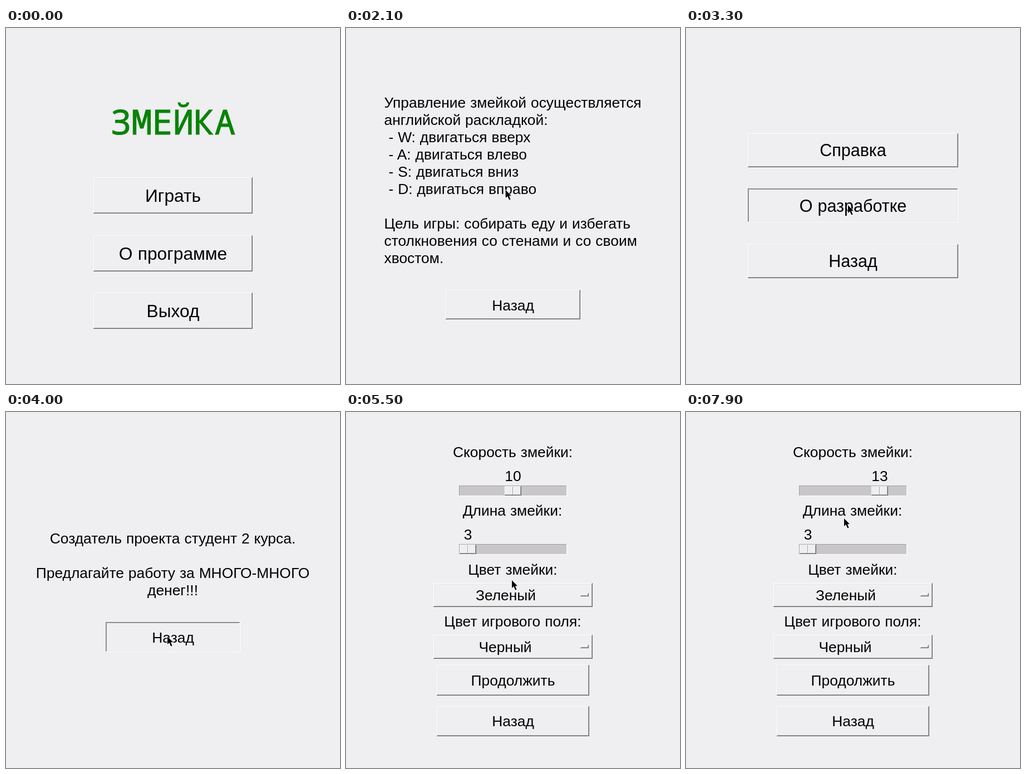
Write an HTML page that moves like this. It is 600 by 639 pixels and loops after 8000 ms.

```html
<!DOCTYPE html>
<html lang="ru">
<head>
<meta charset="utf-8">
<title>Змейка</title>
<style>
  html, body { margin: 0; width: 100%; height: 100%; overflow: hidden; background: #efeef0; }
  svg { display: block; }
  text { font-family: "Liberation Sans", Arial, sans-serif; white-space: pre; word-spacing: .6px; }
  .title { font-family: "Noto Sans Mono", monospace; fill: #078307; stroke: #078307; stroke-width: 1.1px; }
  rect { shape-rendering: crispEdges; }
</style>
</head>
<body>
<svg id="stage" width="600" height="639" viewBox="0 0 600 639"></svg>
<script>
const LOOP = 8000, STEP = 100, SMALL = 26.4;
const stage = document.getElementById('stage');

// Cursor path: [time, x, y] of the arrow tip
const path = [
  [100, 342, 446], [400, 297, 405], [800, 297, 405], [1500, 278, 268],
  [1700, 286, 222], [1900, 286, 222], [2500, 291, 488], [2800, 291, 488],
  [3100, 291, 318], [3400, 291, 318], [3800, 290, 403], [4200, 290, 403],
  [4500, 293, 428], [4900, 293, 428], [5250, 298, 302], [5500, 298, 302],
  [6300, 302, 145], [6600, 302, 145], [7300, 350, 147], [7500, 350, 147],
  [7900, 284, 191]
];

// Screen changes, and presses as [start, end, control]
const scenes = [
  [0, mainMenu], [800, aboutMenu], [1900, help], [2800, aboutMenu],
  [3400, credits], [4200, aboutMenu], [4800, mainMenu], [5500, settings]
];
const presses = [
  [600, 800, 'О программе'], [1700, 1900, 'Справка'], [2600, 2800, 'Назад'],
  [3300, 3400, 'О разработке'], [4000, 4200, 'Назад'], [4600, 4800, 'Назад'],
  [5300, 5500, 'Играть'], [6400, 7500, 'speed']
];

const rect = (x, y, w, h, fill) =>
  `<rect x="${x}" y="${y}" width="${w}" height="${h}" fill="${fill}"/>`;

const text = (s, x, y, size = SMALL, anchor = 'middle', cls = '') =>
  `<text class="${cls}" x="${x}" y="${y}" font-size="${size}" text-anchor="${anchor}" xml:space="preserve">${s}</text>`;

function bevel(x, y, w, h, sunken = false, face = '#efeef0') {
  const [tl, tlIn, br, brIn] = sunken
    ? ['#7d7c7d', '#a09fa0', '#ffffff', '#e9e8ea']
    : ['#ffffff', '#e9e8ea', '#6b6a6b', '#a09fa0'];
  return rect(x, y, w, h, br) + rect(x, y, w - 1, h - 1, tl) +
    rect(x + 1, y + 1, w - 2, h - 2, brIn) + rect(x + 1, y + 1, w - 3, h - 3, tlIn) +
    rect(x + 2, y + 2, w - 4, h - 4, face);
}

const button = (label, x, y, w, h, baseline, size, pressed) =>
  bevel(x, y, w, h, pressed === label) + text(label, 300, baseline, size);

function mainMenu({ pressed }) {
  return text('ЗМЕЙКА', 300, 191, 62.3, 'middle', 'title') +
    button('Играть', 157, 268, 286, 65, 312, 31.7, pressed) +
    button('О программе', 157, 372, 286, 65, 416, 31.7, pressed) +
    button('Выход', 157, 475, 286, 65, 519, 31.7, pressed);
}

function aboutMenu({ pressed }) {
  return ['Справка', 'О разработке', 'Назад'].map((label, i) =>
    button(label, 111, Math.floor(189 + i * 99.5), 378, 61, Math.round(230 + i * 99.5), 30.5, pressed)).join('');
}

function help({ pressed }) {
  const lines = [
    'Управление змейкой осуществляется', 'английской раскладкой:',
    ' - W: двигаться вверх', ' - A: двигаться влево',
    ' - S: двигаться вниз', ' - D: двигаться вправо', '',
    'Цель игры: собирать еду и избегать',
    'столкновения со стенами и со своим', 'хвостом.'
  ];
  return lines.map((s, i) => text(s, 68.5, 143 + i * 31, SMALL, 'start')).join('') +
    button('Назад', 179, 470, 242, 53, 507, SMALL, pressed);
}

function credits({ pressed }) {
  return text('Создатель проекта студент 2 курса.', 299.5, 236) +
    text('Предлагайте работу за МНОГО-МНОГО', 299.5, 298) +
    text('денег!!!', 299.5, 329) +
    button('Назад', 179, 377, 242, 54, 414, SMALL, pressed);
}

function slider(value, center, y, held) {
  const left = center - 15;
  return text(value, center, y - 8) +
    rect(203, y, 194, 19, '#ffffff') + rect(203, y, 193, 18, '#a09fa0') +
    rect(204, y + 1, 192, 17, '#c8c6c8') +
    bevel(left, y + 1, 30, 17, held) +
    rect(center - 1, y + 2, 1, 14, '#a09fa0') + rect(center, y + 2, 1, 14, '#ffffff');
}

const dropdown = (label, y, center) =>
  bevel(157, y, 286, 43) + text(label, center, y + 31) + bevel(421, y + 18, 15, 6);

function settings({ pressed, speed }) {
  return text('Скорость змейки:', 299.5, 81) +
    slider(speed, 300 + (speed - 10) * 16, 132, pressed === 'speed') +
    text('Длина змейки:', 299, 186) + slider(3, 219, 237, false) +
    text('Цвет змейки:', 299.5, 292) + dropdown('Зеленый', 307, 287) +
    text('Цвет игрового поля:', 299.5, 385) + dropdown('Черный', 400, 286) +
    button('Продолжить', 163, 454, 274, 55, 491, SMALL, pressed) +
    button('Назад', 163, 528, 274, 54, 564, SMALL, pressed);
}

function cursorAt(t) {
  const next = path.findIndex(p => p[0] > t);
  if (next === 0) return null;
  if (next < 0) return path[path.length - 1].slice(1);
  const [t0, x0, y0] = path[next - 1], [t1, x1, y1] = path[next];
  const k = (t - t0) / (t1 - t0), e = k * k * (3 - 2 * k);
  return [x0 + (x1 - x0) * e, y0 + (y1 - y0) * e];
}

const arrow = ([x, y]) =>
  `<path transform="translate(${Math.round(x)} ${Math.round(y)})" d="M0 0V14L3.3 11L6.2 17.5L8.6 16.5L5.9 10.3H10Z" stroke="#fff" stroke-width="1.2" paint-order="stroke"/>`;

function render(t) {
  const cursor = cursorAt(t);
  const press = presses.find(([from, to]) => t >= from && t < to);
  const dragged = t >= 6600 ? Math.round((cursorAt(Math.min(t, 7300))[0] - 302) / 16) : 0;
  const scene = scenes.filter(s => s[0] <= t).pop()[1];
  stage.innerHTML = scene({ pressed: press && press[2], speed: 10 + dragged }) +
    (cursor ? arrow(cursor) : '');
}

let shown = -1;
const start = performance.now();
function tick() {
  const t = Math.floor((performance.now() - start) % LOOP / STEP) * STEP;
  if (t !== shown) render(shown = t);
  requestAnimationFrame(tick);
}
tick();
</script>
</body>
</html>
```
